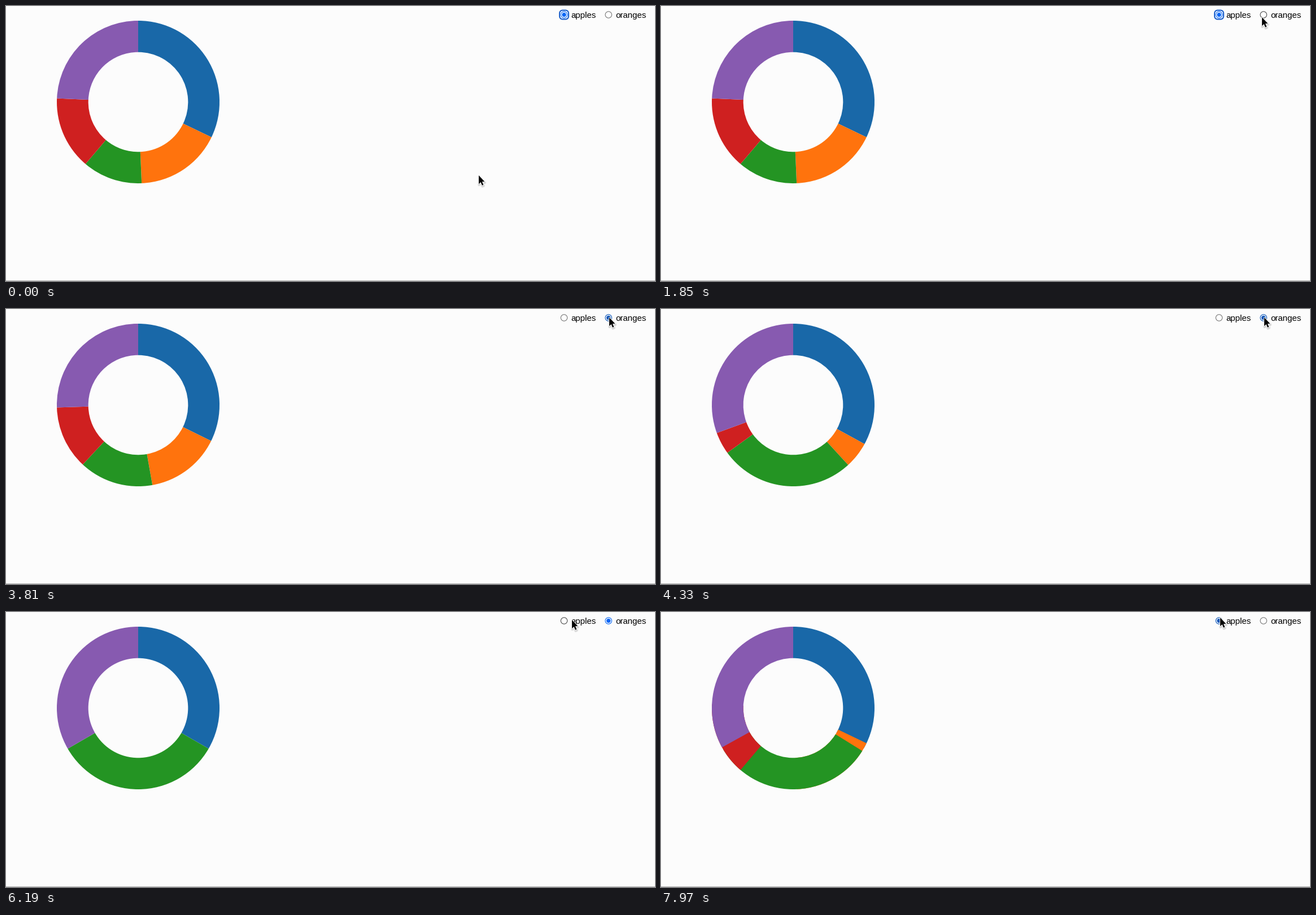
Recreate the animation shown at these times as a matplotlib script. Size 1149 by 487 pixels, loop 7990 ms.

```python
import numpy as np
import matplotlib.pyplot as plt
from matplotlib.animation import FuncAnimation
from matplotlib.patches import Circle, FancyBboxPatch, Polygon, Wedge

W, H, DPI = 1149, 487, 72          # at 72 dpi one point is one pixel
LOOP, STEP = 7990, 34
BG = "#fcfcfc"
COLORS = ["#1968a8", "#ff730d", "#249423", "#cf2020", "#875ab0"]

# Donut data as slice boundaries in degrees, clockwise from the top
CENTER, OUTER, INNER = (234, 170), 144, 88.3
APPLES = [53245, 28479, 19697, 24037, 40245]
ORANGES = [1, 0, 1, 0, 1]
TWEEN = 2000
TO_ORANGES, TO_APPLES = 3165, 7555

# Radio buttons
RADIO_X, RADIO_Y = (988, 15.5), 15.5
RADIO_X = (988, 1066.7)
BLUE, DARK_BLUE = "#0766f5", "#0a55b8"
GREY, DARK_GREY = "#767676", "#4a4a4a"
PRESS = [(2930, 3090, 1), (7270, 7410, 0)]

# Pointer stops: time, x, y
STOPS = np.array([
    (20, 837, 300), (300, 970, 101), (450, 970, 101), (700, 1045, 50),
    (1150, 1062, 27), (1250, 1062, 27), (1650, 1064, 20), (2150, 1064, 20),
    (2750, 1068, 15), (5570, 1068, 15), (6150, 1002, 14), (6430, 1002, 14),
    (7050, 990, 10),
])
ARROW = np.array([(0, 0), (0, 15.2), (3.5, 12), (5.9, 17.7), (8.3, 16.7),
                  (5.9, 11.1), (10.4, 11.1)])


def bounds(values):
    return np.concatenate([[0], np.cumsum(values)]) / sum(values) * 360


def cubic_in_out(u):
    u = min(max(u, 0), 1)
    return 4 * u ** 3 if u < 0.5 else 1 - 4 * (1 - u) ** 3


def mix(a, b, p):
    return a + (b - a) * p


A, O = bounds(APPLES), bounds(ORANGES)


def slices(t):
    """Start and end angles of every slice."""
    if t < TO_APPLES:
        edge = mix(A, O, cubic_in_out((t - TO_ORANGES) / TWEEN))
        return edge[:-1], edge[1:]
    edge = mix(O, A, cubic_in_out((t - TO_APPLES) / TWEEN))
    start, end = edge[:-1].copy(), edge[1:].copy()
    # Slices that come back appear at full size; their neighbours uncover them
    for k in (1, 3):
        start[k], end[k] = A[k], A[k + 1]
    return start, end


def pointer(t):
    return np.array([np.interp(t, STOPS[:, 0], STOPS[:, k]) for k in (1, 2)])


fig = plt.figure(figsize=((W + 0.001) / DPI, (H + 0.001) / DPI), dpi=DPI,
                 facecolor=BG)
ax = fig.add_axes([0, 0, 1, 1])
ax.set(xlim=(0, W), ylim=(H, 0))
ax.axis("off")


def add(patch):
    return ax.add_patch(patch)


ax.plot([0, W], [486.5, 486.5], color="#acacac", lw=1)
wedges = [add(Wedge(CENTER, OUTER, 0, 90, width=OUTER - INNER, fc=c, lw=0))
          for c in COLORS]

focus = add(FancyBboxPatch((RADIO_X[0] - 8, RADIO_Y - 8), 16, 16,
                           boxstyle="round,pad=0,rounding_size=6",
                           fc="white", ec="#1259c9", lw=2))
rims = [add(Circle((x, RADIO_Y), 5.7, fc="white", lw=1.1)) for x in RADIO_X]
dots = [add(Circle((x, RADIO_Y), 3.7, lw=0)) for x in RADIO_X]
for x, label in ((1000.5, "apples"), (1079.2, "oranges")):
    ax.text(x, 21.3, label, family="Liberation Sans", size=15, color="black",
            va="baseline")

shadows = [add(Polygon(ARROW, fc="none", ec="black", alpha=0.06, lw=w,
                       joinstyle="round", zorder=5)) for w in (5, 3.5, 2)]
outline = add(Polygon(ARROW, fc="white", ec="white", lw=1.8, zorder=6))
arrow = add(Polygon(ARROW, fc="black", lw=0, zorder=7))


def draw_radios(t, tip):
    checked = 1 if PRESS[0][1] <= t < PRESS[1][1] else 0
    over = [982 <= tip[0] <= 1045 and tip[1] < 25,
            1060 <= tip[0] <= 1134 and tip[1] < 25]
    focus.set_visible(t < PRESS[0][1])
    for k in (0, 1):
        on = k == checked
        down = any(a <= t < b and k == i for a, b, i in PRESS)
        blue = DARK_BLUE if over[k] else BLUE
        grey = DARK_GREY if over[k] else GREY
        rims[k].set_edgecolor(blue if on else grey)
        rims[k].set_facecolor("#dedede" if down else "white")
        dots[k].set_facecolor(blue)
        dots[k].set_visible(on)


def draw(i):
    t = i * STEP
    for wedge, a, b in zip(wedges, *slices(t)):
        wedge.set_visible(b - a > 0.01)
        wedge.set_theta1(a - 90)
        wedge.set_theta2(b - 90)
    tip = pointer(t)
    draw_radios(t, tip)
    for s in shadows:
        s.set_xy(ARROW + tip + (0.5, 1.8))
    outline.set_xy(ARROW + tip)
    arrow.set_xy(ARROW + tip)
    return []


anim = FuncAnimation(fig, draw, frames=LOOP // STEP, interval=STEP,
                     init_func=lambda: draw(0), repeat=True, repeat_delay=0)
plt.show()
```
